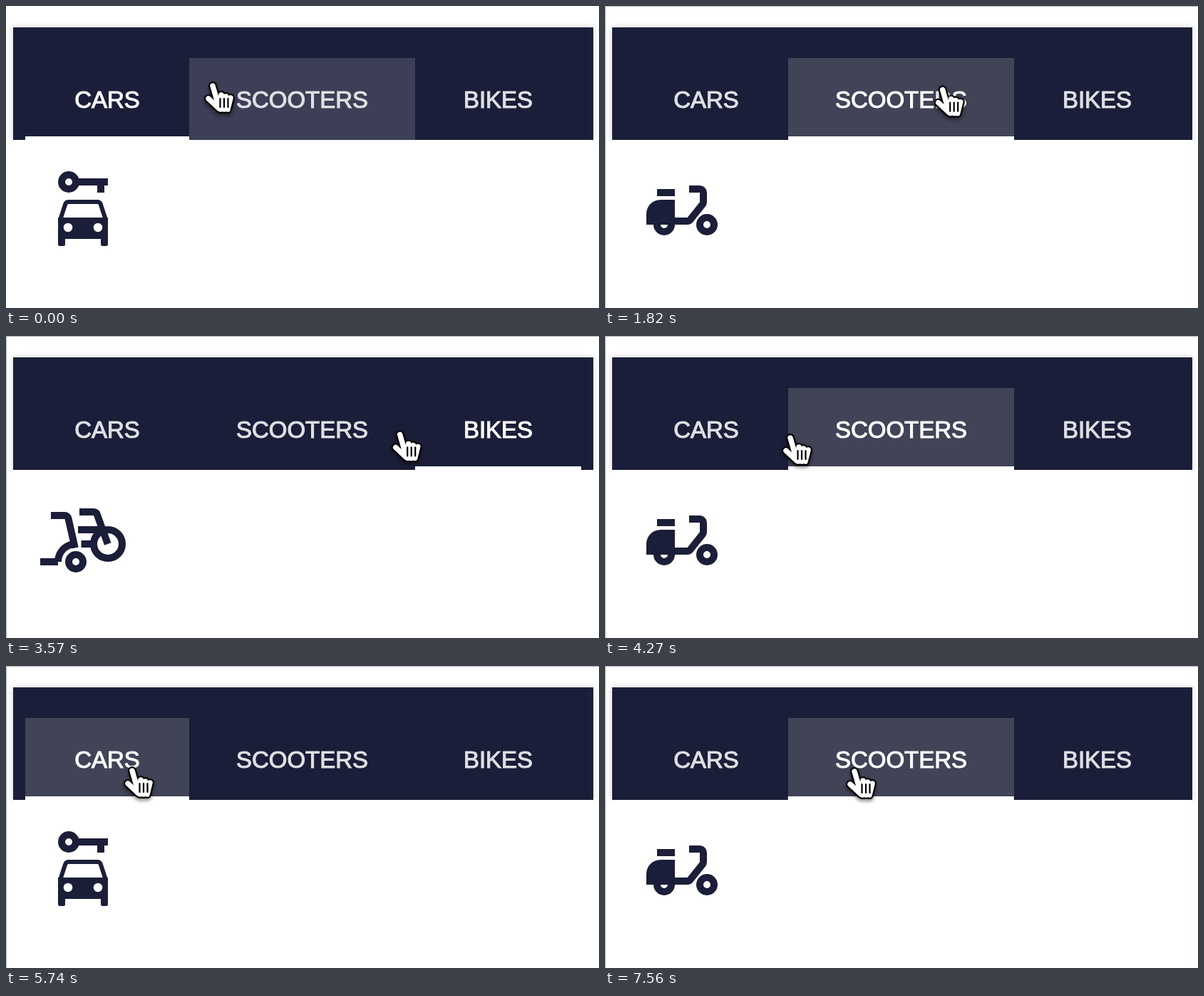
These frames come from a looping animation (832 px wide and 424 px high, 7.7 s). An HTML page with a canvas:

```html
<!DOCTYPE html>
<html lang="en">
<head>
<meta charset="utf-8">
<title>Vehicle tabs</title>
<style>
  html, body { margin: 0; width: 100%; height: 100%; overflow: hidden; background: #fff; }
  canvas { display: block; }
</style>
</head>
<body>
<canvas id="stage" width="832" height="424"></canvas>
<script>
const ctx = document.getElementById('stage').getContext('2d');
const LOOP = 7700, TICK = 70;
const NAVY = '#1b1e38';

const TABS = [
  { label: 'CARS', x: 27, w: 230, icon: drawCar },
  { label: 'SCOOTERS', x: 257, w: 317, icon: drawScooter },
  { label: 'BIKES', x: 574, w: 233, icon: drawBike }
];

// [time, tab]
const CLICKS = [[-1000, 0], [1020, 1], [2610, 2], [3670, 1], [5220, 0], [7110, 1]];
const HOVERS = [[-1000, 1], [2180, 2], [3570, 1], [4340, 0], [6720, 1]];

// [time, x, y]
const POINTER = [
  [1160, 278, 105], [2450, 637, 116], [2610, 637, 116], [2800, 616, 118], [3500, 570, 131],
  [4270, 248, 136], [4900, 165, 140], [6440, 165, 140], [6650, 272, 142], [6930, 338, 141]
];

const clamp = v => Math.max(0, Math.min(1, v));
const mix = (a, b, k) => a + (b - a) * k;

// Cubic bezier (.35, 0, .25, 1), solved by bisection.
function ease(x) {
  x = clamp(x);
  let lo = 0, hi = 1;
  for (let i = 0; i < 24; i++) {
    const s = (lo + hi) / 2, r = 1 - s;
    if (1.05 * r * r * s + .75 * r * s * s + s * s * s < x) lo = s; else hi = s;
  }
  return lo * lo * (3 - 2 * lo);
}

const latest = (events, t) => events.findLastIndex(e => e[0] <= t);

function pointerAt(t) {
  const i = latest(POINTER, t);
  const a = POINTER[Math.max(0, i)], b = POINTER[Math.min(i + 1, POINTER.length - 1)];
  const k = a === b ? 0 : (t - a[0]) / (b[0] - a[0]);
  return [mix(a[1], b[1], k), mix(a[2], b[2], k)];
}

function rect(color, x, y, w, h) {
  ctx.fillStyle = color;
  ctx.fillRect(x, y, w, h);
}

function disc(color, x, y, r) {
  ctx.fillStyle = color;
  ctx.beginPath();
  ctx.arc(x, y, r, 0, Math.PI * 2);
  ctx.fill();
}

function arc(x, y, r, from = 0, to = Math.PI * 2) {
  ctx.beginPath();
  ctx.arc(x, y, r, from, to);
  ctx.stroke();
}

// Strokes a path whose corners are rounded.
function line(...points) {
  ctx.beginPath();
  ctx.moveTo(...points[0]);
  points.slice(1, -1).forEach((p, i) => ctx.arcTo(...p, ...points[i + 2], 1));
  ctx.lineTo(...points.at(-1));
  ctx.stroke();
}

function drawCar() {
  arc(8, 4, 2);
  line([10, 4], [19, 4]);
  line([17, 4], [17, 7]);
  ctx.lineWidth = 1.2;
  line([5.6, 14.7], [7.25, 9.6], [16.75, 9.6], [18.4, 14.7]);
  rect(NAVY, 5, 14, 14, 6);
  ctx.beginPath();
  for (const x of [5, 17]) ctx.roundRect(x, 18, 2, 4, .5);
  ctx.fill();
  for (const x of [7.8, 16.2]) disc('#fff', x, 16.8, 1.25);
}

function drawScooter() {
  rect(NAVY, 5, 6, 5, 2);
  rect(NAVY, 6, 9, 4, 7);
  ctx.beginPath();
  ctx.roundRect(2, 9, 6, 7, [4, 0, 0, 0]);
  ctx.fill();
  arc(7, 16, 2, 0, Math.PI);
  arc(19, 16, 2);
  line([14, 6], [18, 6], [18, 10], [14, 15], [9, 15]);
}

function drawBike() {
  arc(10, 18, 2);
  line([0, 18], [5, 18]);
  arc(10, 18, 5, Math.PI, Math.PI * 1.5);
  line([3, 5], [7.7, 5], [9.76, 14.1]);
  arc(19, 13, 4);
  line([11, 4], [15.7, 4], [18.95, 13]);
  line([10.6, 9], [18, 9]);
  line([11.5, 13], [15, 13]);
}

function drawIcon(draw) {
  ctx.save();
  ctx.translate(48, 227);
  ctx.scale(5, 5);
  ctx.strokeStyle = NAVY;
  ctx.lineWidth = 2;
  draw();
  ctx.restore();
}

function drawHeader(t) {
  ctx.save();
  ctx.shadowColor = 'rgba(20,25,50,.22)';
  ctx.shadowBlur = 8;
  rect(NAVY, 10, 30, 814, 158);
  ctx.restore();
  rect('#fff', 10, 188, 814, 12);

  const c = latest(CLICKS, t), [clicked, selected] = CLICKS[c];
  const [entered, hovered] = HOVERS[latest(HOVERS, t)];
  ctx.globalAlpha = clamp((t - entered) / 450);
  rect(hovered === selected ? '#414357' : '#3c3f56', TABS[hovered].x, 73, TABS[hovered].w, 115);
  ctx.globalAlpha = 1;

  const from = TABS[CLICKS[Math.max(0, c - 1)][1]], to = TABS[selected];
  const k = ease((t - clicked) / 470);
  rect('#fff', mix(from.x, to.x, k), 183, mix(from.w, to.w, k), 5);

  drawClick(t, clicked);

  ctx.font = '33px "Liberation Sans", Arial, sans-serif';
  ctx.textAlign = 'center';
  ctx.lineWidth = 1.1;
  TABS.forEach(({ label, x, w }, i) => {
    ctx.fillStyle = ctx.strokeStyle = i === selected ? '#fff' : '#dfe0e4';
    ctx.fillText(label, x + w / 2, 143);
    ctx.strokeText(label, x + w / 2, 143);
  });

  drawIcon(to.icon);
}

function drawClick(t, start) {
  const k = (t - start) / 300;
  if (k < 0 || k >= 1) return;
  const [x, y] = pointerAt(start);
  disc(`rgba(50,90,160,${.9 * (1 - k)})`, x + 12, y + 3, mix(25, 10, k));
}

// Thumb, index finger and three folded fingers, each a thick round stroke.
const hand = new Path2D('M6 25L21 39M12 7L21 38');
for (let i = 0; i < 3; i++) {
  hand.moveTo(24 + 6.5 * i, 20 + 2 * i);
  hand.lineTo(23 + 5 * i, 40);
}

function drawPointer(t) {
  ctx.save();
  ctx.translate(...pointerAt(t));
  ctx.lineCap = ctx.lineJoin = 'round';
  ctx.strokeStyle = '#000';
  ctx.lineWidth = 12;
  ctx.shadowColor = 'rgba(0,0,0,.45)';
  ctx.shadowBlur = 5;
  ctx.shadowOffsetY = 3;
  ctx.stroke(hand);
  ctx.shadowColor = 'transparent';
  ctx.strokeStyle = '#fff';
  ctx.lineWidth = 7.5;
  ctx.stroke(hand);
  ctx.strokeStyle = '#000';
  ctx.lineWidth = 2.2;
  for (let i = 0; i < 3; i++) line([22.5 + 5.5 * i, 25], [22.5 + 5.5 * i, 37]);
  ctx.restore();
}

function frame(now) {
  const t = Math.floor((now % LOOP) / TICK) * TICK;
  rect('#fff', 0, 0, 832, 424);
  drawHeader(t);
  if (t >= 280) {
    rect('#b5b5b5', 0, 0, 832, 1);
    rect('#b5b5b5', 0, 0, 1, 424);
  }
  drawPointer(t);
  requestAnimationFrame(frame);
}
frame(0);
</script>
</body>
</html>
```
